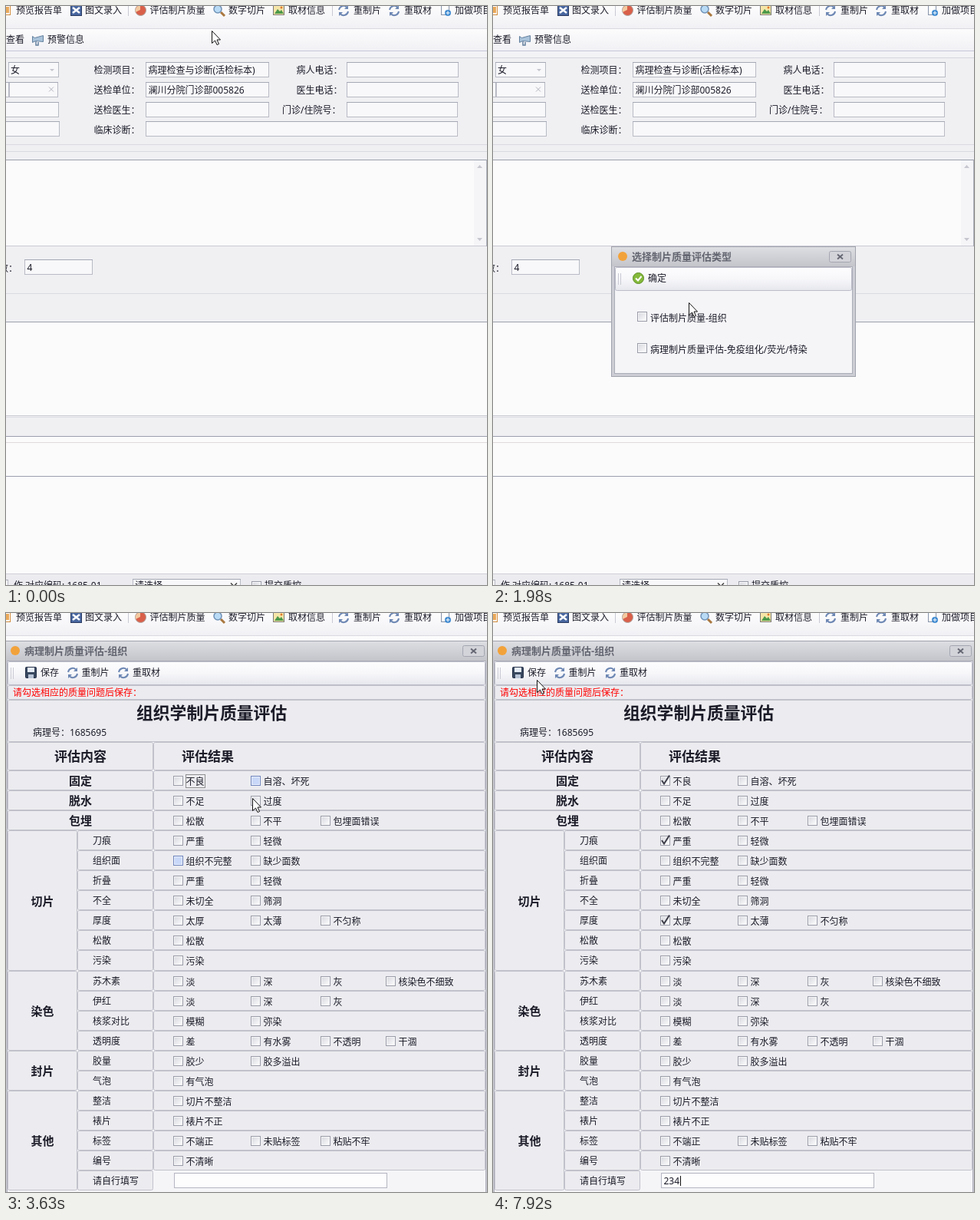
An HTML page for the animation above (8000 ms loop, 627 px wide and 754 px high).

```html
<!DOCTYPE html>
<html lang="zh-CN">
<head>
<meta charset="utf-8">
<title>制片质量评估</title>
<style>
html, body { margin: 0; width: 100%; height: 100%; overflow: hidden; background: #f0f0f3; }
svg { display: block; width: 627px; height: 754px; }
text { font: 12px "Noto Sans", "Noto Sans CJK SC", "Noto Sans CJK", sans-serif; fill: #1b1b28; white-space: pre; }
.title { font-size: 13px; font-weight: 700; fill: #62646f; }
.cat { font-size: 15px; font-weight: 700; text-anchor: middle; }
.head { font-size: 17px; font-weight: 700; }
.big { font-size: 21.8px; font-weight: 700; }
.red { fill: #f00; }
</style>
</head>
<body>
<svg id="stage" viewBox="0 0 627 754" lang="zh-CN">
  <defs>
    <linearGradient id="bar" x2="0" y2="1"><stop stop-color="#fdfdfe"/><stop offset=".5" stop-color="#f7f7fa"/><stop offset="1" stop-color="#e6e7ed"/></linearGradient>
    <linearGradient id="strip" x2="0" y2="1"><stop stop-color="#fcfcfd"/><stop offset="1" stop-color="#f1f1f5"/></linearGradient>
    <linearGradient id="caption" x2="0" y2="1"><stop stop-color="#dddee2"/><stop offset="1" stop-color="#c4c5cb"/></linearGradient>
    <linearGradient id="press" x2="0" y2="1"><stop stop-color="#a9abb6"/><stop offset=".5" stop-color="#c3c5cf"/><stop offset="1" stop-color="#dfe0e7"/></linearGradient>
    <linearGradient id="box" x2="1" y2="1"><stop stop-color="#d9dae0"/><stop offset="1" stop-color="#fbfbfc"/></linearGradient>
    <g id="refresh" fill="none" stroke="#6d87b3" stroke-width="2">
      <path d="M2 7A6 6 0 0 1 12 3.5M14 9A6 6 0 0 1 4 12.5"/>
      <path d="M14 1V6H9ZM2 15V10H7Z" fill="#6d87b3" stroke="none"/>
    </g>
  </defs>
</svg>
<script>
const STEP = 100 * 330 / 8000;
const sheet = [];

// Timeline of held states: [step, declarations]
function track(states) {
  const name = 'k' + sheet.length;
  const frames = states.map(([step, css]) => `${step * STEP}%{${css}}`).join('');
  sheet.push(`@keyframes ${name}{${frames}}.${name}{animation:${name} 8s step-end infinite}`);
  return name;
}

// Shows markup from one step until another
function during(from, to, markup) {
  const states = [[0, 'opacity:0'], [from, 'opacity:1']];
  if (to) states.push([to, 'opacity:0']);
  return `<g class="${track(states)}">${markup}</g>`;
}

const text = (x, y, s, cls = '') => `<text x="${x}" y="${y}" class="${cls}">${s}</text>`;
const fill = (x, y, w, h, color, extra = '') => `<rect x="${x}" y="${y}" width="${w}" height="${h}" fill="${color}" ${extra}/>`;
const outline = (x, y, w, h, color, stroke, rx = 0, extra = '') =>
  fill(x + .5, y + .5, w - 1, h - 1, color, `stroke="${stroke}" rx="${rx}" ${extra}`);
const line = (y, color) => fill(0, y, 627, 1, color);
const path = (d, stroke, width = 1, color = 'none') => `<path d="${d}" stroke="${stroke}" stroke-width="${width}" fill="${color}"/>`;
const dot = (x, y, r, color, extra = '') => `<circle cx="${x}" cy="${y}" r="${r}" fill="${color}" ${extra}/>`;
const refresh = (x, y) => `<use href="#refresh" x="${x}" y="${y}"/>`;
const field = (x, y, right) => outline(x, y, right - x, 20, '#f8f8fa', '#b9bbc5') + fill(x, y, right - x, 1, '#a5a8b4');

const checkbox = (x, y) => outline(x, y, 13, 13, '#f7f7f9', '#9a9ca7') + fill(x + 2, y + 2, 9, 9, 'url(#box)');
const hover = (x, y) => outline(x, y, 13, 13, '#e9effd', '#7186bd') + fill(x + 2, y + 2, 9, 9, '#c9d8f8');
const tick = (x, y) => path(`M${x + 2} ${y + 6}L${x + 5} ${y + 10.5}L${x + 12} ${y - .5}`, '#3b3c47', 2);
const focus = (x, y, w, h) => outline(x, y, w, h, 'none', '#333', 0, 'stroke-dasharray="1 1"');

function closeButton(x, y) {
  return outline(x, y, 29, 15, '#d3d4da', '#a4a6b0', 2) +
    path(`M${x + 11} ${y + 4.5}l7 6m0-6l-7 6`, '#666874', 2);
}

function frame(x, y, w, h, title) {
  return outline(x, y, w, h, '#cdced5', '#a1a3ad') +
    fill(x + 1, y + 1, w - 2, 25, 'url(#caption)') +
    outline(x + 4, y + 26, w - 8, h - 30, '#f5f5f8', '#aaacb7') +
    dot(x + 15, y + 13, 6, '#f2a23a') +
    text(x + 27, y + 18, title, 'title') +
    closeButton(x + w - 35, y + 6);
}

function toolbar(x, y, w) {
  const grip = [4.5, 7.5].map(dx => path(`M${x + dx} ${y + 8}v15`, '#c9cad3')).join('');
  return outline(x, y, w, 31, 'url(#bar)', '#bbbcc8', 2) + grip;
}

function mainWindow() {
  let s = fill(0, 0, 627, 754, '#f0f0f3') + fill(0, 0, 627, 29, 'url(#strip)') + line(29, '#d9d9e0') +
    fill(0, 30, 627, 28, 'url(#strip)') + line(58, '#c6c7d8') + fill(0, 59, 627, 8, '#f3f3f6') + line(67, '#d4d5de');

  // top bar icons
  s += outline(-8, -3, 14, 15, '#fff', '#d08a3a') + fill(-4, 1, 8, 8, '#e9a95a') +
    outline(84, -2, 15, 15, '#4967a0', '#28395f') + path('M87 2l9 7m0-7l-9 7', '#fff', 2.5) +
    dot(175.5, 5.5, 7, '#d9604a', 'stroke="#b0a6a2"') + '<path d="M175 5V-1A7 7 0 0 0 169 8Z" fill="#f3c9a0"/>' +
    path('M280 8l5 5', '#a9773f', 3) + dot(276, 4, 5, '#b9dbf5', 'stroke="#6f90b5" stroke-width="1.5"') +
    outline(348, -1, 15, 13, '#f6e6a8', '#7b7b74') + '<path d="M350 10l4-6 3 3 2-2 3 5z" fill="#4e9a4b"/>' + dot(359, 2, 1.5, '#e0782e') +
    refresh(432, -2) + refresh(498, -2) +
    outline(567, -3, 11, 15, '#fff', '#8793a8') + dot(576, 9, 4, '#3f8ad0') + path('M573.5 9h5m-2.5-2.5v5', '#fff') +
    fill(159, 0, 1, 13, '#c9cad3') + fill(425, 0, 1, 13, '#c9cad3');
  [[13, '预览报告单'], [103, '图文录入'], [187.5, '评估制片质量'], [290, '数字切片'], [368, '取材信息'],
   [453, '重制片'], [519, '重取材'], [585, '加做项目']].forEach(([x, label]) => s += text(x, 10, label));
  s += text(0, 48, '查看') + text(54, 48, '预警信息') +
    path('M34.5 39.5l3 2 11-3v8l-10-1-4 2z', '#64809e', 1, '#a9c3da') + path('M39 46v5h3v-4', '#64809e', 1.5);

  // patient form
  s += field(3, 73, 69) + text(6, 88, '女') + '<path d="M57 82h6l-3 3z" fill="#c3c4cc"/>' +
    field(-6, 99, 4) + field(4, 99, 68) + path('M56 105.5l6 6m0-6l-6 6', '#b3b5be') + field(-6, 125, 69) + field(-6, 150, 70);
  ['检测项目：', '送检单位：', '送检医生：', '临床诊断：'].forEach((label, i) => s += text(114.5, [88, 114, 140, 166][i], label));
  [['病人电话：', 378.5], ['医生电话：', 378.5], ['门诊/住院号：', 360]].forEach(([label, x], i) => {
    const y = 73 + 26 * i;
    s += text(x, y + 15, label) + field(182, y, 343) + field(444, y, i < 2 ? 590 : 589);
  });
  s += field(182, 150, 589) + text(185.5, 88, '病理检查与诊断(活检标本)') + text(185.5, 114, '澜川分院门诊部005826');

  // text areas
  s += line(180, '#d9dae0') + line(189, '#d9dae0') + fill(0, 200, 627, 113, '#fbfbfc') + line(200, '#9ca0ad') + line(312, '#c9cad3') +
    fill(610, 201, 16, 111, '#f5f5f8') + fill(626, 200, 1, 113, '#a9acb8') +
    '<path d="M614 211h7l-3.500-4zM614 302h7l-3.500 4z" fill="#c6c7cf"/>' +
    text(-9, 346, '数：') + field(24, 330, 113) + text(27.5, 345, '4') + line(374, '#dadbe1') +
    fill(0, 411, 627, 122, '#fbfbfc') + line(411, '#9ca0ad') + line(533, '#c9cad3') + line(535, '#dcdde3') + line(560, '#9ca0ad') +
    fill(0, 561, 627, 178, '#fbfbfc') + line(568, '#dfdadd') + line(612, '#9ca0ad') + line(739, '#cfd0d8') + fill(0, 740, 627, 14, '#ececf0');

  // footer
  return s + field(-6, 747, 3) + text(10, 759, '作 对应编码: 1685-01') + field(165, 746, 306) + text(168, 759, '请选择') +
    path('M293 751.500l4 4 4-4', '#444', 1.5) + checkbox(320, 749) + text(337, 759, '提交质控');
}

const pickTitle = '选择制片质量评估类型', formTitle = '病理制片质量评估-组织';

function pickDialog(inner = '') {
  return frame(154, 313, 319, 170, pickTitle) + toolbar(159, 340, 309) + inner +
    dot(189.5, 354.5, 7, '#84b93a', 'stroke="#5d8c24"') + path('M186 354.500l3 3 4.500-5.500', '#fff', 2) +
    text(202, 359, '确定') + checkbox(188, 398) + text(205, 410.5, '评估制片质量-组织') +
    checkbox(188, 439) + text(205, 451.5, '病理制片质量评估-免疫组化/荧光/特染');
}

const groups = [
  ['固定', ':不良 自溶、坏死'],
  ['脱水', ':不足 过度'],
  ['包埋', ':松散 不平 包埋面错误'],
  ['切片', '刀痕:严重 轻微', '组织面:组织不完整 缺少面数', '折叠:严重 轻微', '不全:未切全 筛洞', '厚度:太厚 太薄 不匀称', '松散:松散', '污染:污染'],
  ['染色', '苏木素:淡 深 灰 核染色不细致', '伊红:淡 深 灰', '核浆对比:模糊 弥染', '透明度:差 有水雾 不透明 干涸'],
  ['封片', '胶量:胶少 胶多溢出', '气泡:有气泡'],
  ['其他', '整洁:切片不整洁', '裱片:裱片不正', '标签:不端正 未贴标签 粘贴不牢', '编号:不清晰', '请自行填写:'],
];
const columns = [218, 319, 410, 495];
const rowTop = i => 205 + 26 * i + (i > 9);
const cell = (left, top, right, bottom) => outline(left, top, right - left, bottom - top, '#ececf0', '#c1c1cb', 2);

function formDialog() {
  let s = frame(-3, 36, 633, 730, formTitle) + toolbar(2, 63, 623);
  s += outline(25, 70, 15, 15, '#39485f', '#27324a', 1) + fill(28, 71, 9, 6, '#e4ebf5') + fill(29, 80, 7, 5, '#b8c4d6') +
    refresh(79, 70) + refresh(145, 70) + text(45, 82, '保存') + text(98.5, 82, '重制片') + text(165, 82, '重取材');
  s += cell(2, 94, 625, 113) + text(9, 108, '请勾选相应的质量问题后保存：', 'red') +
    cell(2, 113, 625, 168) + text(170, 137.5, '组织学制片质量评估', 'big') + text(35, 160, '病理号：1685695') +
    cell(2, 168, 192, 205) + cell(192, 168, 625, 205) + text(63, 193, '评估内容', 'head') + text(229, 193, '评估结果', 'head');
  let i = 0;
  for (const [name, ...rows] of groups) {
    const top = rowTop(i), bottom = rowTop(i + rows.length);
    const right = rows[0][0] === ':' ? 192 : 93;
    s += cell(2, top, right, bottom) + text((2 + right) / 2, (top + bottom) / 2 + 6, name, 'cat');
    for (const row of rows) {
      const [label, options] = row.split(':');
      const y = rowTop(i++);
      if (label) s += cell(93, y, 192, rowTop(i)) + text(113, y + 18, label);
      if (!options) continue;
      s += cell(192, y, 625, rowTop(i));
      options.split(' ').forEach((option, c) => s += checkbox(columns[c], y + 7) + text(columns[c] + 16.5, y + 19, option));
    }
  }
  return s + outline(219, 729, 278, 20, '#fdfdfe', '#b4b6c1');
}

// Row marks: [row, column, from, to]
const hovers = [[0, 1, 11, 12], [4, 0, 11, 15], [0, 0, 12, 14], [3, 0, 13, 15], [7, 0, 15, 17], [16, 0, 17, 18], [19, 0, 21, 22]];
const ticks = [[0, 13], [3, 14], [7, 16]];
const focused = [[0, 11, 14], [3, 14, 16], [7, 16, 19]];
const caret = x => fill(x, 733, 1, 13, '#111');

function formMarks() {
  return hovers.map(([r, c, a, b]) => during(a, b, hover(columns[c], rowTop(r) + 7))).join('') +
    ticks.map(([r, a]) => during(a, 0, tick(218, rowTop(r) + 7))).join('') +
    focused.map(([r, a, b]) => during(a, b, focus(234, rowTop(r) + 5, 26, 18))).join('') +
    during(19, 20, caret(223)) + during(20, 21, text(222.5, 744, '2') + caret(230)) +
    during(21, 0, text(222.5, 744, '234')) + during(21, 23, caret(244)) + during(24, 0, caret(244));
}

function pickMarks() {
  return during(4, 6, hover(188, 398)) + during(7, 9, hover(188, 398)) +
    during(7, 10, tick(188, 398) + focus(204, 397, 102, 17));
}

const pointer = [[0, 268, 32], [1, 226, 10], [3, 356, 334], [4, 278, 417], [5, 265, 403], [6, 255, 386], [7, 255, 400],
  [8, 219, 357], [9, 219, 353], [10, 523, 207], [11, 321, 241], [12, 232, 220], [13, 238, 287], [14, 240, 303], [15, 238, 392],
  [16, 240, 452], [17, 203, 709], [18, 223, 728], [20, 269, 731], [21, 293, 607], [22, 88, 253], [23, 82, 122], [24, 57, 87]];
const pointerTrack = track(pointer.map(([step, x, y]) => [step, `transform:translate(${x}px,${y}px)`]));

const pressed = fill(178, 346, 52, 18, 'url(#press)');
const ghost = `<g opacity=".3" transform="translate(313.5 398) scale(.96) translate(-313.5 -398)">${pickDialog(pressed)}${tick(188, 398)}</g>`;

document.getElementById('stage').insertAdjacentHTML('beforeend',
  mainWindow() +
  during(2, 3, outline(165, -4, 99, 20, '#8f93a8', '#8f93a8', 2, 'opacity=".2"') + `<g opacity=".8">${frame(156, 314, 315, 168, pickTitle)}</g>`) +
  during(3, 10, pickDialog(during(9, 10, pressed)) + pickMarks()) +
  during(10, 11, ghost + `<g opacity=".66">${frame(2, 42, 623, 712, formTitle)}</g>`) +
  during(11, 0, formDialog() + formMarks()) +
  `<g class="${pointerTrack}">${path('M.5 .5V16.500L4.500 13L7 18.500L9.500 17.500L7 12H11.500Z', '#111', 1, '#fff')}</g>`);

const style = document.createElement('style');
style.textContent = sheet.join('\n');
document.head.append(style);
</script>
</body>
</html>
```
